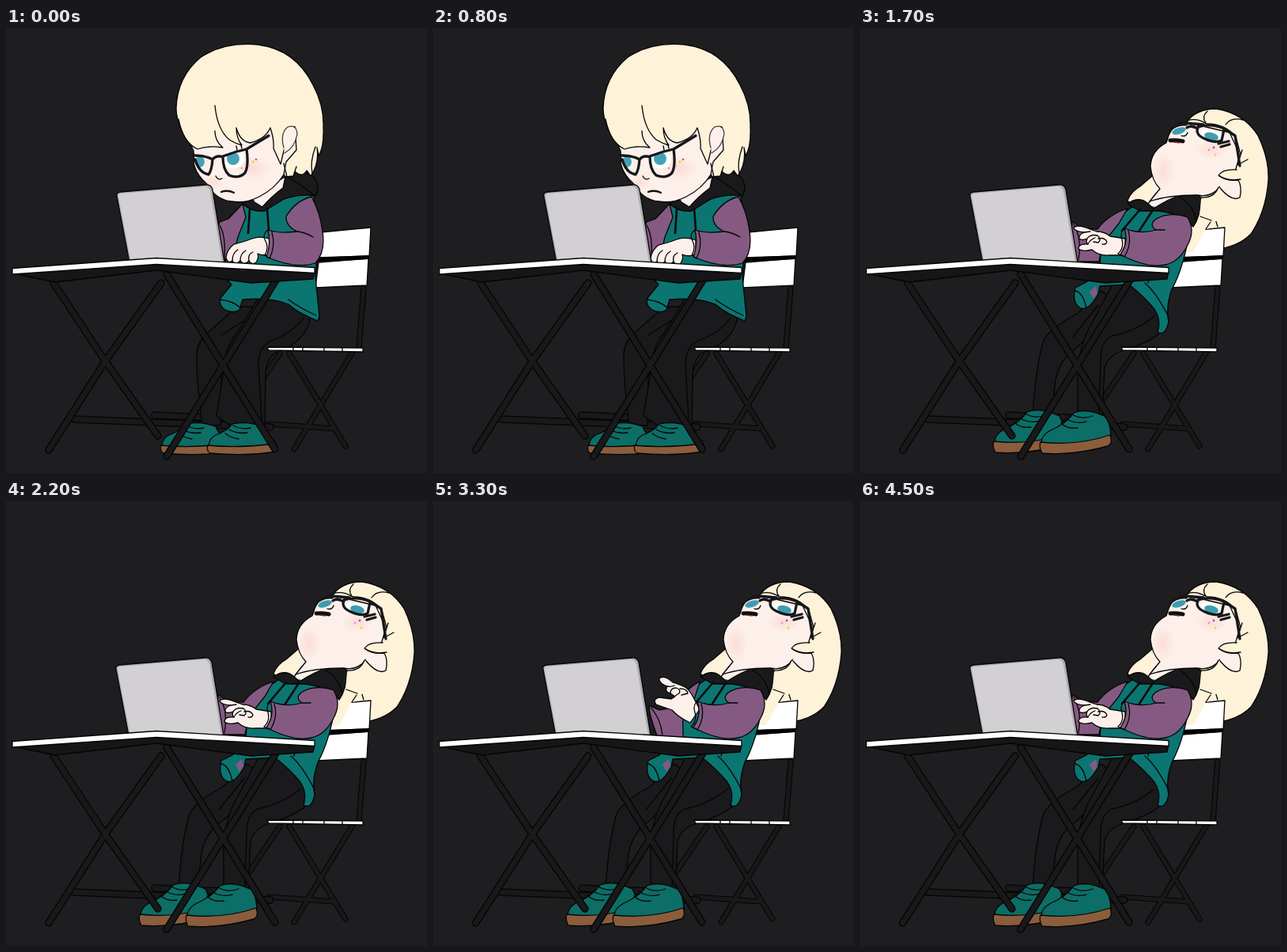
Recreate the animation shown at these times as an HTML page. Size 532 px wide and 562 px high, loop 4.6 s.

```html
<!DOCTYPE html>
<html lang="en">
<head>
<meta charset="utf-8">
<title>Typing at the desk</title>
<style>
  html, body { margin: 0; width: 100%; height: 100%; overflow: hidden; background: #1e1d20; }
  svg { display: block; width: 532px; height: 562px; }
  .ink { stroke: #050505; stroke-width: 1.3; stroke-linejoin: round; stroke-linecap: round; }
  .line { fill: none; }
  .teal { fill: #0b7572; }
  .shoe { fill: #0c6e66; }
  .sole { fill: #8b5d3d; }
  .purple { fill: #855a82; }
  .dark { fill: #1a191b; }
  .skin { fill: #fdf0ea; }
  .hair { fill: #fef2d9; }
  .white { fill: #fff; }
  .cord { fill: none; stroke: #0b0b0c; stroke-width: 2.6; stroke-linecap: round; }
  .frame { fill: none; stroke: #17171a; stroke-width: 3.3; stroke-linecap: round; stroke-linejoin: round; }
  .edge { fill: none; stroke: #040404; stroke-width: 9.4; stroke-linecap: round; }
  .core { fill: none; stroke: #19181a; stroke-width: 6.8; stroke-linecap: round; }
  .thin.edge { stroke-width: 7.2; }
  .thin.core { stroke-width: 5; }
</style>
</head>
<body>
<svg viewBox="0 0 532 562">
  <defs>
    <radialGradient id="blush">
      <stop stop-color="#f5b5ab" stop-opacity=".32"/>
      <stop offset="1" stop-color="#f5b5ab" stop-opacity="0"/>
    </radialGradient>

    <path id="tableLegs" d="M60 322L125 420 192 515M196 322L126 420 54 533M203 311L340 532M342 317L203 541"/>
    <path id="tableBars" d="M86 494L334 504M188 489L276 493"/>
    <path id="chairLegs" d="M358 411L429 528M437 411L364 532M452 329L446 404M346 411L290 494M332 500L415 506"/>

    <g id="flatShoe">
      <path class="ink shoe" d="M256 528Q257 518 265 514Q279 509 286 500Q300 497 313 500L324 503Q328 515 341 522L341 530Z"/>
      <path class="ink sole" d="M255 527Q290 531 341 525Q345 531 341 535Q305 541 258 537Q253 534 255 527Z"/>
      <path class="ink line" d="M277 512Q285 518 294 519M282 507Q292 513 305 511M287 502Q298 508 309 505"/>
    </g>
    <g id="tiltShoe">
      <path class="ink shoe" d="M229 525Q229 514 241 508Q260 500 270 486Q283 481 298 486L311 491Q317 502 317 518L300 527Z"/>
      <path class="ink sole" d="M228 523Q275 528 316 514Q320 524 313 528Q270 540 230 537Q226 531 228 523Z"/>
      <path class="ink line" d="M254 499Q262 507 275 505M260 493Q272 501 286 497M268 488Q280 495 294 490"/>
    </g>

    <g id="rest">
      <path d="M335 267Q322 262 311 266Q298 271 288 273Q279 280 278 290Q280 298 286 294Q290 300 296 294Q301 301 307 294Q311 300 316 296Q320 290 318 285Q327 289 335 284Z"/>
      <path class="line" d="M286 294Q286 284 293 280M296 294Q296 285 303 281M307 294Q305 286 312 283"/>
    </g>
    <g id="type">
      <path d="M335 266L316 263Q309 257 299 257L285 252Q275 248 270 252Q271 257 284 258Q276 261 277 266Q280 269 287 266Q285 271 288 273Q276 272 276 279Q281 283 293 280Q302 288 315 287L335 287Z"/>
      <path class="line" d="M284 258L291 257M287 266Q291 260 300 262Q306 267 301 271L295 270M288 273Q291 267 297 265M301 266Q309 264 312 270Q311 274 306 273"/>
    </g>
    <g id="lift">
      <path d="M337 263L329 248Q323 236 314 233L303 229Q292 219 286 224Q285 230 296 234Q292 241 300 243L306 247 301 250 286 248Q277 250 282 257L302 264Q311 274 325 280Z"/>
      <path class="line" d="M296 234Q301 235 305 233M300 243Q300 236 307 236Q314 238 311 243L306 246M312 237Q321 237 322 243L314 245"/>
    </g>
  </defs>

  <rect width="532" height="562" fill="#1e1d20"/>

  <!-- hair that hangs behind the chair -->
  <g class="lean">
    <path class="ink hair" d="M412 120Q424 102 450 102Q486 108 503 136Q517 165 516 192Q513 232 494 260Q478 277 446 280Q432 284 408 282L390 225 345 225 338 218Q342 207 354 200L368 188Z"/>
  </g>

  <use href="#chairLegs" class="thin edge"/>
  <use href="#chairLegs" class="thin core"/>
  <path class="ink white" d="M398 258L461 252 459 288 394 290ZM395 296L458 291 456 325 391 328Z"/>
  <path d="M392 290L459 287 458 292 392 296Z"/>
  <use href="#tableBars" class="edge"/>
  <use href="#tableBars" class="core"/>

  <g class="hunch">
    <path class="ink dark" d="M292 352L258 382Q242 394 241 412Q241 450 248 502H271L272 440Q276 420 296 404L345 352Z"/>
    <path class="ink dark" d="M318 342L292 385Q275 405 274 440L266 490 285 503H327L328 440Q328 418 341 410Q372 399 382 376L386 360 350 340Z"/>
    <path class="ink line" d="M376 366Q363 385 335 395Q319 403 319 425L323 495M300 370L272 388"/>
    <use href="#flatShoe" transform="translate(-59)"/>
    <use href="#flatShoe"/>
    <path class="ink teal" d="M302 222L286 237 278 275 277 315 285 324 271 341Q268 350 277 356Q288 361 295 356L299 343Q335 340 357 349Q369 360 394 370L396 364 391 315 394 260 389 212 370 207 335 224Z"/>
    <path class="ink line" d="M271 343Q287 345 296 353M342 318L333 340M392 363Q372 354 357 343"/>
    <path class="ink purple" d="M299 222L281 241 270 245Q264 256 272 291L286 294 293 264 303 239Z"/>
    <path class="ink line" d="M270 249Q278 263 276 291"/>
    <path class="ink dark" d="M352 183Q374 177 389 188Q398 201 391 212Q372 209 351 216L327 231Q311 233 299 222L305 217 340 203Z"/>
    <path class="ink skin" d="M309 212L314 220 324 226Q335 213 350 202L353 188Z"/>
    <path class="ink line" d="M353 186Q372 197 389 211"/>
    <path class="cord" d="M308 229L306 259M330 228L332 254"/>
    <use class="hand ink skin"/>
    <path class="ink purple" d="M331 255Q345 260 368 257Q353 250 354 238Q366 218 386 213Q397 233 400 257Q404 283 391 297Q366 305 329 289Q335 273 331 255Z"/>
    <path class="ink line" d="M331 255Q324 260 327 267Q333 277 327 287L333 291Q341 275 336 258M368 257Q378 258 388 264"/>

    <path class="ink hair" d="M232 145Q216 125 215 102Q216 62 246 37Q276 17 318 21Q366 27 388 72Q402 98 401 125Q402 151 395 161L393 151Q396 171 385 187L380 180Q374 190 365 181L363 187 353 188 340 166 330 140Z"/>
    <path class="ink skin" d="M226 133L237 155 238 174Q242 187 254 197Q265 217 285 219Q303 222 320 213Q340 203 351 185L354 169 367 154 365 125 310 115 265 110Z"/>
    <ellipse cx="262" cy="195" rx="14" ry="10" fill="url(#blush)"/>
    <ellipse cx="312" cy="177" rx="24" ry="17" fill="url(#blush)"/>
    <ellipse cx="287" cy="166" rx="14" ry="11" fill="#fff"/>
    <ellipse cx="245" cy="169" rx="7" ry="8" fill="#fff"/>
    <ellipse cx="287" cy="165" rx="8" ry="8" fill="#45a2b5"/>
    <ellipse cx="245" cy="169" rx="6" ry="7" fill="#45a2b5"/>
    <path class="ink line" d="M265 187Q268 193 273 190"/>
    <path d="M272 207Q280 204 288 208" fill="none" stroke="#17100f" stroke-width="2.4" stroke-linecap="round"/>
    <path class="frame" d="M274 162Q289 156 304 153Q307 174 302 183Q294 191 282 186Q274 179 274 162ZM274 163Q266 160 261 166M239 161Q252 161 261 166Q260 180 256 185Q244 183 239 166"/>
    <path class="ink line" d="M292 154L291 149M298 152L297 148"/>
    <circle cx="312" cy="169" r="1.8" fill="#eed64a"/>
    <circle cx="316" cy="166" r="1.3" fill="#8f60b0"/>
    <circle cx="298" cy="177" r="1.3" fill="#e69a9c"/>
    <circle cx="307" cy="174" r="1.3" fill="#e69acc"/>
    <path class="hair" d="M219 119Q225 145 242 153Q256 148 274 151Q266 143 264 130Q276 143 298 148Q292 140 291 128Q300 143 309 145Q329 139 334 126Q339 141 338 152L347 172 352 145 366 119 360 65 250 58Z"/>
    <path class="ink line" d="M218 115Q224 145 242 153Q256 148 274 151Q264 143 264 130M264 98Q267 128 282 141Q290 146 298 148Q291 139 291 126Q296 144 309 145Q328 140 334 126Q339 141 338 152L347 172 352 151"/>
    <path class="ink skin" stroke-opacity=".75" d="M351 151Q346 133 356 125Q367 121 368 134Q365 151 352 158"/>
    <path class="ink line" d="M387 183Q384 169 391 150M351 171L355 188M365 181L367 175"/>
    <path class="frame" d="M304 153L332 136"/>
  </g>

  <g class="lean">
    <path class="ink dark" d="M305 332L274 361Q236 381 231 398Q221 435 218 493H242L247 445Q252 420 270 407L332 352Z"/>
    <path class="ink dark" d="M320 322L293 373Q276 401 275 440V495H306L309 430Q313 414 331 408Q369 396 381 383L388 355 360 322Z"/>
    <path class="ink line" d="M372 364Q348 383 318 389Q304 395 304 420L302 490M301 350L269 390"/>
    <use href="#tiltShoe" transform="translate(-59 -1)"/>
    <use href="#tiltShoe"/>
    <path class="hair" d="M402 222L444 224 452 251 437 254 430 267 421 283 405 283Z"/>
    <path class="ink line" d="M447 235L452 251M443 245L437 254"/>
    <path class="ink teal" d="M344 226L321 242 305 275 303 300 286 321 272 328Q268 345 276 352Q287 361 301 336L303 326 340 324Q360 340 372 355 381 369 376 384Q386 390 390 371Q386 353 394 330Q410 301 417 252L408 235 370 222Z"/>
    <path class="purple" d="M298 326L290 333 295 342 300 335Z"/>
    <path class="ink line" d="M272 332Q282 334 286 354M349 316L338 324M390 365Q375 335 360 322M368 303L364 322"/>
    <g id="farArm">
      <path class="ink purple" d="M338 228Q315 235 300 254L280 253 269 245Q265 251 272 295H302L306 273 327 247Z"/>
      <path class="ink line" d="M270 248Q281 266 276 293"/>
    </g>
    <path class="skin" d="M374 196L364 224 393 230 420 210 410 190Z"/>
    <path class="ink dark" d="M338 222Q352 212 363 221L371 228Q389 216 405 211L428 209 431 216Q430 239 421 251Q405 234 377 231L353 231Z"/>
    <path class="ink line" d="M404 214Q420 222 425 243M364 222L374 209"/>
    <path class="cord" d="M354 229L331 256M370 230L353 256"/>
    <use class="hand ink skin"/>
    <path class="ink purple" d="M334 253Q354 261 374 255Q365 249 373 242Q390 231 414 239Q424 256 414 274Q404 295 386 299Q363 304 329 286Q340 270 334 253Z"/>
    <path class="ink line" d="M334 253Q328 258 331 267Q334 278 326 285L334 289Q344 273 339 256M374 255L385 255"/>

    <path class="ink skin" d="M412 119Q395 122 390 136L387 145Q368 155 367 175Q369 193 379 203L366 219Q389 211 426 211Q444 215 455 200L474 181 480 160 467 132Z"/>
    <ellipse cx="383" cy="180" rx="15" ry="24" fill="url(#blush)"/>
    <ellipse cx="444" cy="153" rx="21" ry="13" fill="url(#blush)"/>
    <ellipse cx="443" cy="136" rx="14" ry="7" fill="#fff" transform="rotate(14 443 136)"/>
    <ellipse cx="444" cy="137" rx="9" ry="5" fill="#3d9db0" transform="rotate(14 444 137)"/>
    <ellipse cx="403" cy="130" rx="9" ry="4" fill="#3d9db0" transform="rotate(-18 403 130)"/>
    <path class="ink line" d="M406 136Q412 138 414 132"/>
    <path d="M392 142Q399 141 408 143" fill="none" stroke="#130e0e" stroke-width="5" stroke-linecap="round"/>
    <path d="M396 144L404 145" stroke="#74302c" stroke-width="1.5"/>
    <circle cx="447" cy="151" r="1.4" fill="#8f60b0"/>
    <circle cx="441" cy="154" r="1.4" fill="#e69acc"/>
    <circle cx="449" cy="160" r="1.6" fill="#eed64a"/>
    <path class="hair" d="M412 119Q426 113 438 121Q462 121 475 138L482 170 476 179Q458 178 453 186Q465 194 481 191V217Q463 208 453 201Q448 215 431 216L429 239 447 245 480 232 505 190 490 128 454 106Z"/>
    <path class="ink line" d="M414 117Q425 113 438 121Q462 121 475 138L481 160M439 105Q431 112 437 120M462 122Q469 112 484 116M483 154L477 173 490 166M476 179Q458 178 453 186Q465 194 481 191M453 201Q448 215 431 214M430 238L444 243"/>
    <path class="ink skin" d="M454 187Q464 194 478 192Q483 201 480 214Q470 220 455 202"/>
    <path class="frame" d="M411 120L434 122M427 125Q443 120 460 127L474 136 480 174M427 125Q423 135 436 140Q449 146 457 142L460 128M427 127Q418 122 413 126M391 130Q399 121 412 122"/>
    <path class="frame" d="M453 146L466 143M456 150L467 147"/>
  </g>

  <path class="ink white" d="M330 403L451 404 451 409 332 407Z"/>
  <path class="ink line" d="M363 404V408M375 404V408M402 404V409M425 404V409"/>

  <g id="laptop">
    <path class="ink" fill="#aeacb0" d="M140 212Q139 208 145 207L252 198Q259 197 261 204L276 296H156Z"/>
    <path fill="#d2d0d3" d="M142 212Q142 209 147 209L251 200Q256 200 258 206L273 296H158Z"/>
  </g>

  <use href="#tableLegs" class="edge"/>
  <use href="#tableLegs" class="core"/>
  <path class="ink" fill="#161517" d="M9 310L190 297 390 308 388 317 310 322 205 308 190 306 62 321Z"/>
  <path class="ink white" d="M8 303.5L190 290.5 390 302.5V309.5L190 298.5 8 311Z"/>
</svg>
<script>
  const LOOP = 4600, STEP = 100;
  const LEAN_AT = 15, LIFT_AT = 31, DROP_AT = 43;
  const all = sel => [...document.querySelectorAll(sel)];
  const hunch = all('.hunch'), lean = all('.lean'), hands = all('.hand');
  const laptop = document.getElementById('laptop');
  const farArm = document.getElementById('farArm');
  const wave = ['', 'translate(3 -7)', 'translate(2 -3)'];

  function handAt(n) {
    const beat = n % 3;
    if (n < LEAN_AT) return ['rest', beat ? 'translate(-3 1)' : ''];
    if (n >= DROP_AT) return ['type', ''];
    if (n >= LIFT_AT) return ['lift', wave[beat]];
    return beat ? ['type', ''] : ['rest', 'translate(3 -10)'];
  }

  function show(list, on) {
    for (const el of list) el.style.display = on ? '' : 'none';
  }

  let last = -1;
  function draw() {
    const n = Math.floor(performance.now() % LOOP / STEP);
    if (n !== last) {
      last = n;
      const leaning = n >= LEAN_AT;
      const lifted = n >= LIFT_AT && n < DROP_AT;
      show(hunch, !leaning);
      show(lean, leaning);
      const [pose, shift] = handAt(n);
      for (const h of hands) {
        h.setAttribute('href', '#' + pose);
        h.setAttribute('transform', shift);
      }
      farArm.setAttribute('transform', lifted ? 'rotate(-12 335 230)' : '');
      laptop.setAttribute('transform', leaning && !(lifted && n % 3) ? 'translate(-1 0)' : '');
    }
    requestAnimationFrame(draw);
  }
  draw();
</script>
</body>
</html>
```
